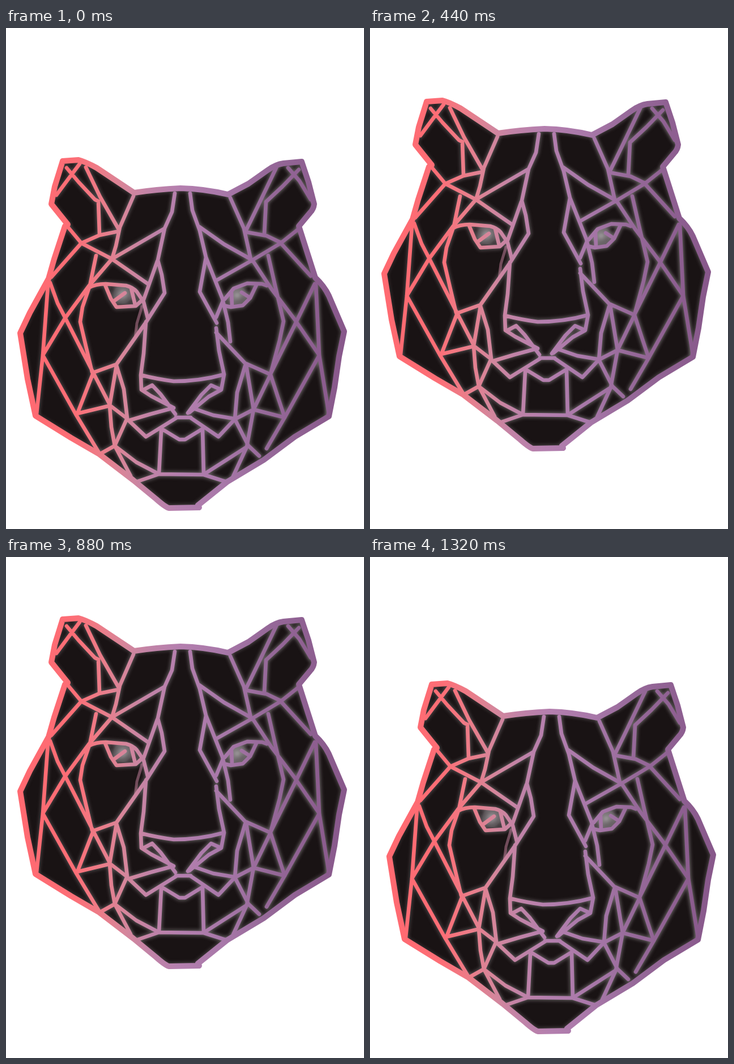
Animation, 632 px wide and 885 px high, one loop 1540 ms. Source, as an HTML page with a canvas:

```html
<!DOCTYPE html>
<html lang="en">
<head>
<meta charset="utf-8">
<title>Bouncing big cat</title>
<style>
html, body { margin: 0; width: 100%; height: 100%; overflow: hidden; background: #fff; }
canvas { display: block; }
</style>
</head>
<body>
<canvas id="stage" width="632" height="885"></canvas>
<script>
const W = 632, H = 885, STEP = 220;
// Offset of the head for each pose
const POSES = [[0, 0], [0, -30], [0, -105], [0, -181], [0, -125], [0, -60], [9, -10]];

const ctx = document.getElementById('stage').getContext('2d');

const outline = new Path2D(
  'M100 235L128 233Q140 236 160 247L226 291Q265 285 308 283Q350 284 392 294L428 275L462 251' +
  'Q476 241 490 239L522 236L534 272L544 311Q543 320 537 326L517 350L531 394L546 441Q562 456 570 473L597 536' +
  'L588 580L580 635L570 686L510 722L455 763L390 802L339 843L341 847L288 848Q282 847 265 832' +
  'L225 799L165 753L115 724L52 685L38 620L25 539L42 503L75 443L85 408L104 350L109 347L80 311L86 280Z');

const lines = {
  leftEar: 'M107 247L128 272L157 303L163 306L165 364M130 240L112 264L89 295M141 246L166 298L198 354' +
    'M108 350L133 380L187 408L252 453M133 380L165 366L199 359M225 297L201 352L194 385L187 408L280 354',
  rightEar: 'M477 247L444 316L425 355M517 250L488 280L459 307L456 365M498 247L518 270L538 303' +
    'M427 361L460 367L485 379M519 353L485 380L435 410L373 445M485 380L538 438' +
    'M396 300L420 354L432 408M341 351L385 382L435 410',
  brow: 'M298 292L293 325L280 354L268 410L275 436L280 468L247 520L195 594L153 609M267 412L243 480' +
    'M325 292L329 322L342 358L353 405L347 438L342 466L372 521M353 405L382 478L392 520L396 554M383 482L371 511',
  leftCheek: 'M187 408L146 456L104 513L65 578M133 380L80 440M159 402L148 455L135 493L131 519L141 562L152 608' +
    'M78 450L91 486L105 513L154 609M74 455L65 578L54 682M65 578L123 682L164 750M154 609L126 681L184 667',
  rightCheek: 'M435 410L468 460L509 514L553 578M463 402L475 455L490 518L483 552L467 611' +
    'M545 452L512 520L467 611M547 452L553 578L570 682M553 578L492 688L460 743M467 612L480 652L492 688L437 674',
  leftJaw: 'M195 596L208 638L214 689L192 738L165 753M154 609L184 667L214 690M195 596L183 667L186 705L192 738L220 791' +
    'M192 738L230 767L270 788M213 690L247 722L302 688M218 693L255 682L296 671',
  rightJaw: 'M371 538L422 592L467 612L437 674L404 691M424 595L437 674L425 740L401 792' +
    'M422 597L408 644L404 691L428 738L447 756M425 740L350 788M404 691L375 722L325 688M402 690L366 684L328 671',
  muzzle: 'M247 519L243 575L238 613Q266 620 296 624Q342 624 385 612L376 570L371 530' +
    'M238 613L239 639L256 650L296 671M241 640L258 631L273 647L299 682' +
    'M385 612L380 639L358 651L324 679M380 639L362 631L345 648L321 680M300 688L326 688' +
    'M278 710L306 727L316 727L347 708M274 712L270 788L349 789L347 708M270 788L232 801M349 789L390 802',
  eyes: 'M146 459Q158 452 176 452L212 455Q224 458 231 466L243 484L250 512M175 454L185 478L195 493L229 491L241 480' +
    'M221 460L228 489M191 482L210 468M460 455L452 452L426 451L402 460L386 479' +
    'M384 490L397 493L418 490L431 477L442 454M398 466L399 490M430 476L416 467'
};
const detail = new Path2D(Object.values(lines).join(''));
const faint = new Path2D('M240 492L231 522L228 548');
const eyes = new Path2D('M178 455L212 456L231 466L239 480L229 491L195 493ZM442 454L426 451L402 460L386 479L384 490L418 490L431 477Z');

function gradient(g, stops) {
  const paint = g.createLinearGradient(20, 0, 604, 0);
  stops.forEach(([at, color]) => paint.addColorStop(at, color));
  return paint;
}

function eyeGlow(g, x, y) {
  const shine = g.createRadialGradient(x, y, 2, x, y, 24);
  shine.addColorStop(0, 'rgba(160,155,158,.9)');
  shine.addColorStop(.6, 'rgba(130,124,128,.6)');
  shine.addColorStop(1, 'rgba(90,84,88,0)');
  g.fillStyle = shine;
  g.fillRect(x - 24, y - 18, 48, 36);
}

// Soft grey halo around a path, stronger towards the right
function halo(g, path, width, strength) {
  g.save();
  g.globalAlpha = strength;
  g.filter = 'blur(3px)';
  g.lineWidth = width;
  g.strokeStyle = gradient(g, [[0, 'rgba(150,142,146,.45)'], [.5, 'rgba(150,142,146,.75)'], [1, 'rgba(150,142,146,.9)']]);
  g.stroke(path);
  g.restore();
}

function drawHead() {
  const head = document.createElement('canvas');
  head.width = W;
  head.height = H;
  const g = head.getContext('2d');
  g.lineCap = g.lineJoin = 'round';
  g.fillStyle = '#191314';
  g.fill(outline);

  g.save();
  g.clip(outline);
  halo(g, detail, 9.5, .8);
  halo(g, outline, 12, .55);
  g.clip(eyes);
  eyeGlow(g, 206, 470);
  eyeGlow(g, 408, 472);
  g.restore();

  g.strokeStyle = gradient(g, [
    [0, '#ff6970'], [.17, '#fd6e76'], [.25, '#ec7c88'], [.33, '#d4869c'], [.4, '#c183a7'],
    [.49, '#b47fae'], [.62, '#a878a9'], [.75, '#966999'], [1, '#87578a']]);
  g.lineWidth = 6.6;
  g.stroke(detail);
  g.lineWidth = 10;
  g.stroke(outline);
  g.globalAlpha = .5;
  g.lineWidth = 5;
  g.stroke(faint);
  return head;
}

const head = drawHead();

function frame(now) {
  const [x, y] = POSES[Math.floor(now / STEP) % POSES.length];
  ctx.fillStyle = '#fff';
  ctx.fillRect(0, 0, W, H);
  ctx.drawImage(head, x, y);
  requestAnimationFrame(frame);
}
frame(0);
</script>
</body>
</html>
```
